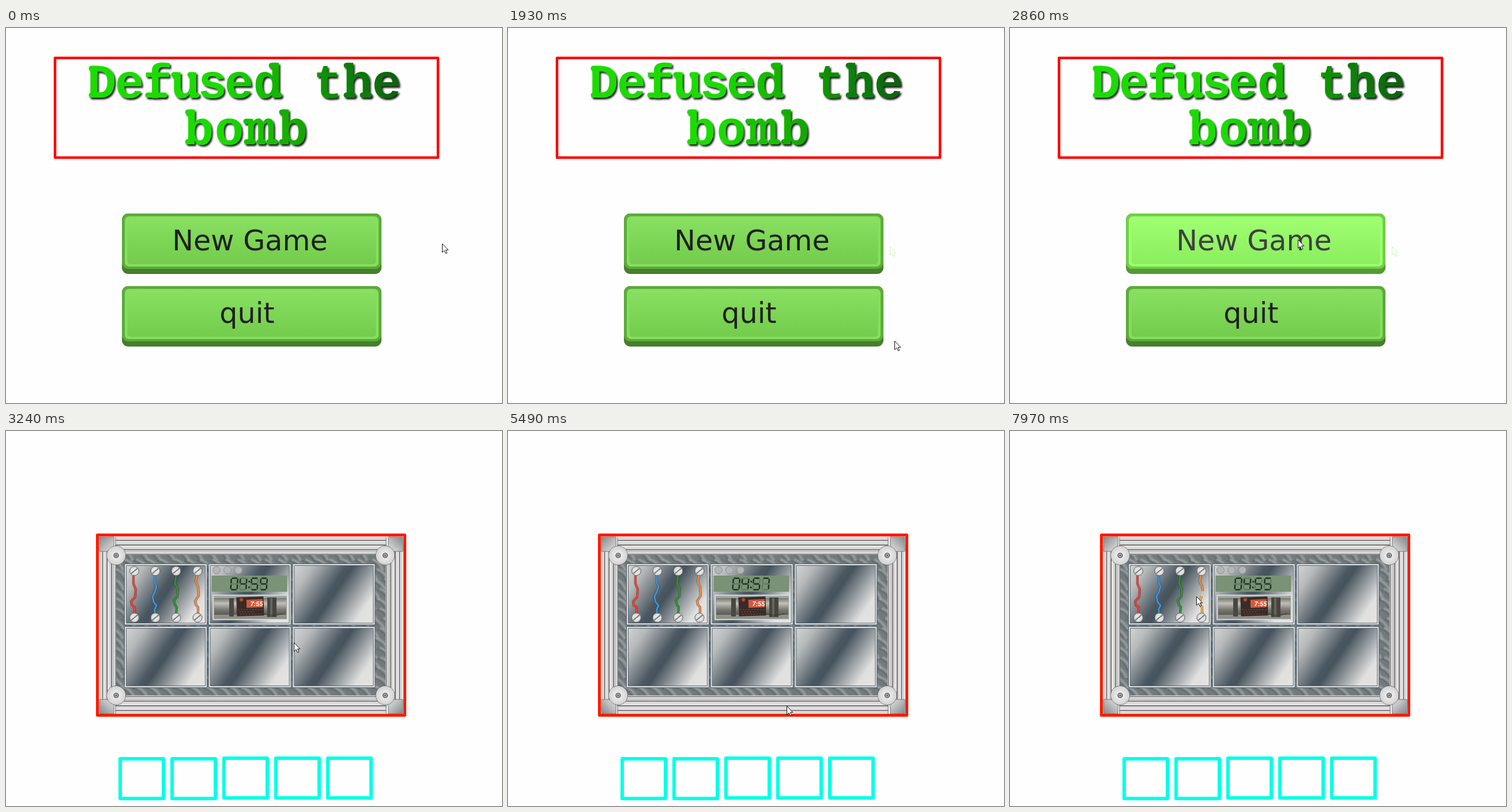
An HTML page that plays this animation: 860x651 px, repeating every 8050 ms.

```html
<!DOCTYPE html>
<html lang="en">
<head>
<meta charset="utf-8">
<title>Bomb game</title>
<style>
  html, body { margin: 0; width: 100%; height: 100%; overflow: hidden; background: #fefefe; }
  svg { display: block; }
  .title { font: bold 84px "Liberation Mono", monospace; }
  .label { font: 49.2px "DejaVu Sans", sans-serif; }
  .clock { font: italic bold 11px "Liberation Sans", sans-serif; }
</style>
</head>
<body>
<svg id="stage" width="860" height="651" viewBox="0 0 860 651">
  <defs>
    <linearGradient id="ink" gradientUnits="userSpaceOnUse" x1="370" y1="130" x2="685" y2="90">
      <stop stop-color="#1adb00"/><stop offset="1" stop-color="#0b5e0a"/>
    </linearGradient>
    <linearGradient id="idle" x2="0" y2="1"><stop stop-color="#89e062"/><stop offset="1" stop-color="#73cc4b"/></linearGradient>
    <linearGradient id="hover" x2="0" y2="1"><stop stop-color="#a0ff72"/><stop offset="1" stop-color="#8aee5e"/></linearGradient>
    <linearGradient id="steel" x1="-.1" y1=".2" x2="1.1" y2=".8">
      <stop stop-color="#d2d3d3"/><stop offset=".16" stop-color="#b6b9ba"/>
      <stop offset=".44" stop-color="#4b5862"/><stop offset=".5" stop-color="#46535c"/>
      <stop offset=".78" stop-color="#c6c8c9"/><stop offset=".84" stop-color="#e0e0df"/><stop offset="1" stop-color="#e4e3e2"/>
    </linearGradient>
    <linearGradient id="corner" x2="1" y2="1"><stop stop-color="#83888a"/><stop offset="1" stop-color="#e4e4e4"/></linearGradient>
    <linearGradient id="tube" x2="0" y2="1">
      <stop stop-color="#76756f"/><stop offset=".3" stop-color="#c0bfb9"/>
      <stop offset=".65" stop-color="#7a7872"/><stop offset="1" stop-color="#57544e"/>
    </linearGradient>
    <radialGradient id="disc"><stop stop-color="#f4f4f4"/><stop offset="1" stop-color="#d2d2d2"/></radialGradient>
    <clipPath id="plate"><path d="M191 215H658V459H191z"/></clipPath>
    <filter id="shade" x="-10%" y="-10%" width="120%" height="130%">
      <feDropShadow dx="2.5" dy="3" stdDeviation="1.5" flood-color="#000" flood-opacity=".9"/>
    </filter>
    <path id="arrow" d="M.5 .5V15.5L4 12.3 6.5 17.5 8.8 16.5 6.4 11.3H10.8z" stroke-width="1"/>
  </defs>
  <g id="menu"></g>
  <g id="game"></g>
  <use id="cursor" href="#arrow" fill="#fff" stroke="#111"/>
</svg>
<script>
const LOOP = 8050, START = 3240, CUT = 7420;
const $ = id => document.getElementById(id);
const rect = (x, y, w, h, fill, extra = '') =>
  `<rect x="${x}" y="${y}" width="${w}" height="${h}" fill="${fill}" ${extra}/>`;
const circle = (x, y, r, fill, extra = '') => `<circle cx="${x}" cy="${y}" r="${r}" fill="${fill}" ${extra}/>`;
const line = (d, color, width, extra = '') =>
  `<path d="${d}" fill="none" stroke="${color}" stroke-width="${width}" ${extra}/>`;
const frame = (color, width) => `stroke="${color}" stroke-width="${width}" stroke-linejoin="round"`;

// Slab serifs relative to a letter's centre and baseline
const slabs = {
  D: 'M-18 -51H-6M-18 -4.5H-6',
  f: 'M-17 -4.5H12',
  u: 'M-20 -40H-14M8 -40H14M14 -4.5H20',
  d: 'M6 -56H14M14 -4.5H20',
  h: 'M-20 -56H-14M-20 -4.5H-8M8 -4.5H20',
  b: 'M-20 -56H-14M-20 -4.5H-14',
  m: 'M-26 -40H-19M-25 -4.5H-14M-3 -4.5H4M14 -4.5H25',
};

// Same ramp as the text gradient, sampled for one letter
function inkAt(x, y) {
  const k = Math.min(1, Math.max(0, ((x - 370) * 315 - (y - 160) * 40) / (315 ** 2 + 40 ** 2)));
  const mix = (a, b) => Math.round(a + (b - a) * k);
  return `rgb(${mix(26, 11)},${mix(219, 94)},${mix(0, 10)})`;
}

function word(text, centres, y) {
  const serifs = [...text].map((c, i) => slabs[c]
    ? line(slabs[c], inkAt(centres[i], y), 9, `transform="translate(${centres[i]} ${y})"`) : '').join('');
  return `<text class="title" y="${y}" x="${centres.map(x => x - 25.2).join(' ')}">${text}</text>${serifs}`;
}

function button(y, x, text, hover, pressed) {
  const [side, rim, light, face, ink] = hover
    ? ['#569a35', '#70cf47', '#9eff72', 'url(#hover)', '#404040']
    : ['#477f2a', '#5dab3b', '#86de5f', 'url(#idle)', '#202020'];
  const top = y + (pressed ? 5 : 0), h = pressed ? 100 : 96;
  return rect(201, top, 450, y + 105 - top, side, 'rx="11"') +
    rect(201, top, 450, h, rim, 'rx="11"') +
    rect(206, top + 5, 440, h - 9, light, 'rx="7"') +
    rect(210.5, top + 5, 431, h - 13, face, 'rx="5"') +
    `<text class="label" x="${x - (pressed ? 1 : 0)}" y="${y + (pressed ? 74 : 64)}" fill="${ink}">${text}</text>`;
}

function buildMenu() {
  return rect(85, 52, 664, 173, 'none', frame('#f00', 4.5)) +
    `<g filter="url(#shade)" fill="url(#ink)" stroke-linecap="round">` +
    word('Defused', [166, 214, 263, 311, 358, 404, 454], 121) +
    word('the', [558, 610, 660], 121) +
    word('bomb', [335, 387, 442, 498], 202) + '</g><g id="buttons"></g>' +
    '<use id="ghost" href="#arrow" x="662" y="379" fill="none" stroke="#c9f7b6"/>';
}

const wires = [
  ['#ff3b30', 'M221 250V265L225 275 224 288 217 296 218 302 223 306V317'],
  ['#3c93dc', 'M258 250V263L261 270 258 280 254 287 256 297 261 303 258 309V317'],
  ['#2f922f', 'M295 250 293 265 298 274 297 287 291 294 293 302 296 306 295 317'],
];
const wireLine = (d, color) => line(d, '#333', 4.4, 'opacity=".6"') + line(d, color, 3);
const wholeWire = wireLine('M331 250 329 262 333 270 334 286 328 295 329 301 333 306V317', '#e98a47');
const cutWire = wireLine('M331 250 329 262 333 269 334 278', '#e98a47') +
  wireLine('M332 287 329 295 330 302 333 306V317', '#f5ae25');

const screw = (x, y) => circle(x, y, 8, 'url(#disc)', frame('#656565', 1)) +
  line(`M${x - 5.5} ${y + 4.5}L${x + 5.5} ${y - 4.5}`, '#777', 2);

// Brushed plate: rows of feathered, slanted strokes
function streaks() {
  let seed = 7, out = '';
  const rnd = () => (seed = seed * 16807 % 2147483647) / 2147483647;
  for (let y = 206; y < 460; y += 17)
    for (let x = 180 + rnd() * 12; x < 660; x += 19 + rnd() * 8) {
      const d = `M${x | 0} ${y}q14 4 ${18 + rnd() * 6 | 0} 19`;
      out += line(d, '#92999b', 7, 'opacity=".45"') + line(d, '#b0b5b6', 2, 'opacity=".5"') +
        line(d, '#596164', 2.5, 'opacity=".5" transform="translate(-5 2)"');
    }
  return `<g clip-path="url(#plate)">${rect(191, 215, 467, 244, '#737a7d')}${out}</g>`;
}

function rails() {
  let out = rect(162, 184, 526, 307, '#dadada');
  for (const [d, c] of [[6, '#666'], [8, '#f1f1f1'], [14, '#5d5550'], [16, '#eee'], [22, '#6b6661'], [25, '#bbb'], [30, '#777']])
    out += line(`M187 ${184 + d}H662M187 ${491 - d}H662M${162 + d * .95} 209V466M${688 - d * .95} 209V466`, c, 1.6);
  out += line('M187 184V214M662 184V214M187 461V491M662 461V491', '#eee', 5) +
    line('M190 184V200M659 184V200M190 475V491M659 475V491', '#777', 1);
  for (const sx of [1, -1]) for (const sy of [1, -1])
    out += `<g transform="translate(${sx > 0 ? 162 : 688} ${sy > 0 ? 184 : 491}) scale(${sx} ${sy})">` +
      rect(0, 0, 25, 25, 'url(#corner)', frame('#777', 1)) + '</g>';
  return out;
}

const discs = () => [191, 657.5].map(x => [216, 459].map(y =>
  circle(x, y, 16.5, 'url(#disc)', frame('#555', 1) + ' stroke-dasharray="2 1"') +
  circle(x, y, 4, '#aaa', frame('#444', 1.2)) + circle(x, y, 1.5, '#666')).join('')).join('');

function cell(col, row) {
  const x = 206 + col * 145.7, y = 231 + row * 109;
  return rect(x - .5, y - .5, 143, 106, '#dfe4e7', frame('#4e5a63', 1)) +
    rect(x + 2.5, y + 2.5, 137, 100, 'url(#steel)', frame('#59656d', 1));
}

function dynamite() {
  return rect(359, 285, 129, 42.5, '#a0a8a2', frame('#e4e8e5', 1.5)) +
    rect(361, 290, 125, 31, 'url(#tube)') + rect(361, 319, 125, 7, '#8d9088') +
    rect(387, 290, 8, 32, '#4a4843') + rect(453, 289, 16, 34, '#45443f') + rect(458, 290, 4, 32, '#66645d') +
    rect(400, 288, 47, 33, '#3a2b27', 'transform="rotate(-2 423 305)"') +
    line('M402 310H446M404 314H430M406 318H443', '#7c4d41', 1.2, 'stroke-dasharray="3 2"') +
    circle(408, 293, 3, '#b5482f') +
    rect(417, 292.5, 28, 14, '#cf5b40', 'transform="rotate(-2 431 300)"') +
    '<text class="clock" x="423.5" y="304" fill="#fff">7:55</text>' +
    line('M446 317Q462 323 480 317', '#383733', 1.2);
}

function buildGame() {
  const cells = [0, 1].map(r => [0, 1, 2].map(c => cell(c, r)).join('')).join('');
  const slots = [0, 1, 2, 3, 4].map(i =>
    rect(198 + 90 * i, 569 - Math.round(.3 * i), 75, 69, 'none', frame('#00ffe6', 6))).join('');
  return rails() + streaks() + cells + discs() +
    rect(158.5, 180.5, 533, 313, 'none', frame('#ff1a00', 5)) +
    wires.map(([c, d]) => wireLine(d, c)).join('') + '<g id="wire"></g>' +
    [222.5, 259, 295, 332].map(x => screw(x, 243) + screw(x, 324)).join('') +
    [365, 384, 403].map(x => circle(x, 241.5, 6.5, '#b3b5b6', frame('#8a8c8d', 1))).join('') +
    rect(356.5, 251, 131, 28, '#7a9275') + '<g id="timer"></g>' + dynamite() + slots;
}

// Segments a to g of one digit, 12 by 22 units
const segments = ['M2 1H11', 'M12 2V10', 'M12 12V20', 'M2 21H11', 'M1 12V20', 'M1 2V10', 'M2 11H11'];
const lit = { 0: 'abcdef', 4: 'bcfg', 5: 'acdfg', 6: 'acdefg', 7: 'abc', 8: 'abcdefg', 9: 'abcdfg' };
const digit = (n, x) => `<g transform="translate(${x} 254.5) skewX(-4)">` +
  segments.map((d, i) => lit[n].includes('abcdefg'[i])
    ? line(d, '#1c3122', 2.4) : line(d, '#5d755a', 1.8)).join('') + '</g>';
const timer = sec => digit(0, 390) + digit(4, 405.5) + digit(5, 425) + digit(sec, 441) +
  rect(420.5, 260, 2.5, 3, '#1c3122') + rect(420, 270, 2.5, 3, '#1c3122');

// Pointer moves: first step, last step, number of steps, end point
const moves = [
  [80, 540, 7, 505, 373], [1470, 1720, 4, 674, 452], [1930, 2010, 2, 666, 633], [2090, 2170, 2, 600, 598],
  [2320, 2630, 5, 498, 497], [2710, 2860, 3, 499, 367], [3560, 3720, 3, 507, 523], [4880, 5490, 9, 483, 477],
  [5570, 5720, 3, 468, 466], [6030, 6800, 10, 326, 285], [6870, 7120, 4, 334, 279], [7890, 7970, 2, 323, 287],
];
function pointer(t) {
  let x = 756, y = 374;
  for (const [from, to, steps, ex, ey] of moves) {
    if (t < from) break;
    const k = t >= to ? 1 : (Math.floor((t - from) / (to - from) * (steps - 1)) + 1) / steps;
    x += (ex - x) * k;
    y += (ey - y) * k;
  }
  return [Math.round(x), Math.round(y)];
}

$('menu').innerHTML = buildMenu();
$('game').innerHTML = buildGame();

const drawn = {};
function update(id, html) {
  if (drawn[id] !== html) $(id).innerHTML = drawn[id] = html;
}

function draw(now) {
  const t = now % LOOP, playing = t >= START, [x, y] = pointer(t);
  const over = top => x > 201 && x < 651 && y > top && y < top + 105;
  $('menu').style.display = playing ? 'none' : '';
  $('game').style.display = playing ? '' : 'none';
  $('ghost').style.display = t >= 310 ? '' : 'none';
  $('cursor').setAttribute('transform', `translate(${x} ${y})`);
  update('buttons', button(322, 288.3, 'New Game', over(322), t >= 1090 && t < 1470) +
    button(448, 370.3, 'quit', over(448), false));
  update('timer', timer(9 - Math.max(0, Math.floor((t - START + 10) / 1010))));
  update('wire', t >= CUT ? cutWire : wholeWire);
}

const began = performance.now();
(function tick() {
  draw(performance.now() - began);
  requestAnimationFrame(tick);
})();
</script>
</body>
</html>
```
